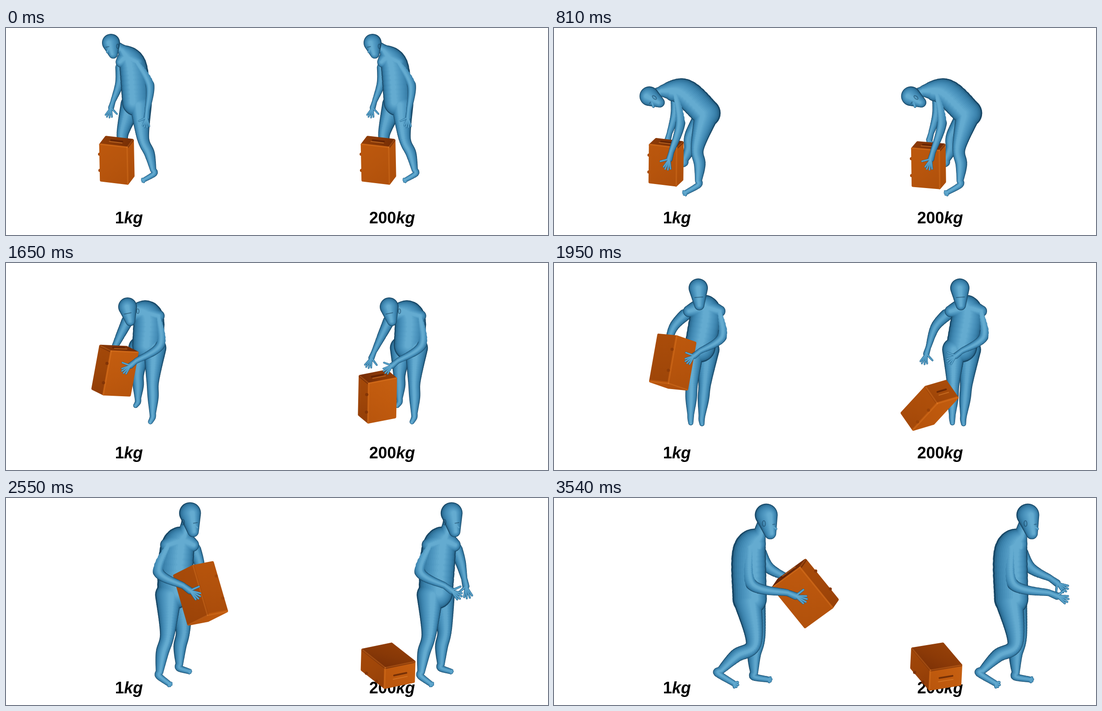
Recreate the animation shown at these times as an HTML page with a canvas. Size 1208 by 463 pixels, loop 3.57 s.

```html
<!DOCTYPE html>
<html lang="en">
<head>
<meta charset="utf-8">
<title>1kg and 200kg</title>
<style>
  html, body { margin: 0; width: 1208px; height: 463px; overflow: hidden; background: #fff; }
  svg, canvas { position: absolute; left: 0; top: 0; display: block; }
  text { font: bold 36px "Liberation Sans", Arial, sans-serif; fill: #000; }
  tspan { font-style: italic; }
</style>
</head>
<body>
<svg width="1208" height="463">
  <text x="243" y="437">1<tspan>kg</tspan></text>
  <text x="809.5" y="437">200<tspan>kg</tspan></text>
</svg>
<canvas id="stage" width="1208" height="463"></canvas>
<script>
const ctx = document.getElementById('stage').getContext('2d');
const LOOP = 3570, STEP = 30, SHIFT = 583, LAYERS = 11;
const CASE_HALF = [33, 47, 22], LIGHT = [.25, .45, .5];
const SKIN = [[24, 72, 103], [46, 112, 152], [62, 134, 176], [78, 151, 192], [100, 171, 208]];
const CASE = [[92, 30, 4], [156, 68, 8], [192, 90, 14], [228, 126, 36]];

// Key poses: facing runs from -1 (left) to 1 (right); pairs are right, left
const stand = {
  at: 0, facing: -.8, size: .88, elbows: [-6, -16], lift: 0,
  head: [234, 33], chin: [239, 58], neck: [262, 50], chest: [283, 84], pelvis: [290, 166],
  handR: [239, 163], handL: [315, 184], footR: [258, 300], footL: [328, 317]
};
const stoop = {
  at: 390, facing: -1, size: .96, elbows: [-5, -8], lift: 0,
  head: [211, 141], chin: [234, 155], neck: [242, 129], chest: [288, 133], pelvis: [335, 180],
  handR: [254, 222], handL: [262, 276], footR: [292, 295], footL: [322, 342]
};
const turn = {
  at: 1650, facing: -.2, size: .92, elbows: [0, -32], lift: 0,
  head: [271, 98], chin: [277, 130], neck: [292, 102], chest: [317, 121], pelvis: [315, 184],
  handR: [238, 197], handL: [290, 219], footR: [294, 302], footL: [327, 336]
};
const carry = {
  at: 2250, facing: .2, size: .99, elbows: [24, -25], lift: 0,
  head: [370, 33], chin: [374, 74], neck: [363, 82], chest: [361, 108], pelvis: [346, 195],
  handR: [285, 182], handL: [371, 184], footR: [322, 378], footL: [334, 352]
};
const walk = {
  at: 2820, facing: .97, size: 1.12, elbows: [48, 14], lift: 0,
  head: [437, 35], chin: [446, 76], neck: [420, 82], chest: [399, 115], pelvis: [400, 222],
  handR: [484, 209], handL: [486, 176], footR: [357, 393], footL: [433, 385]
};
const moved = (pose, dx, dy, changes) => {
  const next = { ...pose };
  for (const name of ['head', 'chin', 'neck', 'chest', 'pelvis', 'handR', 'handL'])
    next[name] = [pose[name][0] + dx, pose[name][1] + dy];
  return { ...next, ...changes };
};
const poses = [
  stand, stoop,
  moved(stoop, 6, 16, { at: 1260, elbows: [-5, -24], handL: stoop.handL }),
  turn, carry, walk,
  moved(walk, 36, 3, { at: 3540, lift: 36, footR: [371, 386], footL: [446, 391] })
];

// Suitcases: place, and yaw, pitch, roll
const resting = [
  { at: 0, place: [247, 296], turn: [-.32, .43, -.02] },
  { at: 390, place: [251, 305], turn: [-.37, .4, -.02] }
];
const lifted = [
  ...resting,
  { at: 1260, place: [247, 288], turn: [-.2, .25, .08] },
  { at: 1650, place: [243, 241], turn: [.6, .2, .18] },
  { at: 2250, place: [313, 212], turn: [1.33, -.39, .16] },
  { at: 2820, place: [526, 214], turn: [2.72, .1, -.66] },
  { at: 3540, place: [560, 214], turn: [2.75, .12, -.68] }
];
const toppled = [
  ...resting,
  { at: 1260, place: [252, 308], turn: [-.08, .3, 0] },
  { at: 1650, place: [245, 299], turn: [.48, .43, .02] },
  { at: 2250, place: [265, 349], turn: [1.91, .85, 1.72] },
  { at: 2820, place: [270, 388], turn: [2.5, .93, 2.46] },
  { at: 3540, place: [269, 377], turn: [2.5, .93, 2.44] }
];

const mix = (a, b, f) => a + (b - a) * f;
const clamp = f => Math.max(0, Math.min(1, f));
const smooth = f => (f = clamp(f)) * f * (3 - 2 * f);
const add = (p, x, y) => [p[0] + x, p[1] + y];
const between = (p, q, f) => [mix(p[0], q[0], f), mix(p[1], q[1], f)];
const unit = (p, q) => {
  const x = q[0] - p[0], y = q[1] - p[1], n = Math.hypot(x, y) || 1;
  return [x / n, y / n];
};
// Midpoint of p and q, pushed sideways
const joint = (p, q, push) => {
  const [x, y] = unit(p, q);
  return add(between(p, q, .5), -y * push, x * push);
};

function tint(stops, f) {
  const p = clamp(f) * (stops.length - 1);
  const i = Math.min(Math.floor(p), stops.length - 2);
  return `rgb(${stops[i].map((c, n) => Math.round(mix(c, stops[i + 1][n], p - i)))})`;
}

// Monotone cubic through the keys, for every field
function sample(keys, t) {
  let i = 0;
  while (i < keys.length - 2 && t >= keys[i + 1].at) i++;
  const h = keys[i + 1].at - keys[i].at, f = (t - keys[i].at) / h, g = 1 - f;
  const curve = get => {
    const slope = k => (get(keys[k + 1]) - get(keys[k])) / (keys[k + 1].at - keys[k].at);
    const tangent = k => {
      if (k === 0) return slope(0);
      if (k === keys.length - 1) return slope(k - 1) * .4;
      const p = slope(k - 1), q = slope(k);
      return p * q <= 0 ? 0 : 2 * p * q / (p + q);
    };
    return get(keys[i]) * (1 + 2 * f) * g * g + get(keys[i + 1]) * f * f * (3 - 2 * f)
      + h * f * g * (g * tangent(i) - f * tangent(i + 1));
  };
  const out = {};
  for (const name in keys[0]) {
    const v = keys[0][name];
    out[name] = Array.isArray(v) ? v.map((_, j) => curve(k => k[name][j])) : curve(k => k[name]);
  }
  return out;
}

// Discs along a smooth line of [x, y, r] points
function tube(...pts) {
  const discs = [];
  for (let i = 0; i < pts.length - 1; i++) {
    const a = pts[Math.max(i - 1, 0)], b = pts[i], c = pts[i + 1];
    const d = pts[Math.min(i + 2, pts.length - 1)];
    const len = Math.hypot(c[0] - b[0], c[1] - b[1]);
    const n = Math.ceil(len / (Math.min(b[2], c[2]) * .35)) + 1;
    for (let k = 0; k <= n; k++) {
      const f = k / n;
      discs.push(b.map((v, j) => v + .5 * f * (c[j] - a[j]
        + f * (2 * a[j] - 5 * v + 4 * c[j] - d[j] + f * (3 * (v - c[j]) + d[j] - a[j])))));
    }
  }
  return discs;
}

// Fill the tubes from dark rim to bright core; fade softens the first tube's root
function paint(tubes, lean, dim = 0, fade = 0) {
  for (let k = 0; k < LAYERS; k++) {
    const f = k / (LAYERS - 1);
    ctx.fillStyle = tint(SKIN, Math.pow(f, .65) - dim);
    ctx.beginPath();
    tubes.forEach((discs, n) => {
      const from = n ? 0 : Math.floor(fade * (1 - f) * discs.length);
      for (let i = from; i < discs.length; i++) {
        const [x, y, r] = discs[i], s = r * (1 - .8 * f), cx = x + lean * r * f;
        ctx.moveTo(cx + s, y);
        ctx.arc(cx, y, s, 0, 7);
      }
    });
    ctx.fill();
  }
}

function digits(from, tip, angles, r) {
  const dx = tip[0] - from[0], dy = tip[1] - from[1];
  return angles.map(([a, len]) => {
    const c = Math.cos(a) * len, s = Math.sin(a) * len;
    return tube([...from, r + .6], [...add(from, dx * c - dy * s, dx * s + dy * c), r]);
  });
}

function arm(shoulder, wrist, bend, s, thumb) {
  const elbow = joint(shoulder, wrist, bend);
  const [x, y] = unit(elbow, wrist);
  const tip = add(wrist, x * 39 * s, (y + .18) * 37 * s);
  const palm = between(wrist, tip, .42);
  return [
    tube([...shoulder, 15.5 * s], [...elbow, 11.5 * s], [...wrist, 6.8 * s]),
    tube([...wrist, 6.5 * s], [...palm, 7.5 * s]),
    ...digits(palm, tip, [[-.38, .92], [-.13, 1], [.13, 1], [.36, .9], [thumb, .85]], 2.1 * s)
  ];
}

function leg(hip, ankle, bend, facing, near, s) {
  const knee = joint(hip, ankle, -bend);
  const [x, y] = unit(knee, ankle);
  const heel = add(ankle, x * 9, y * 9);
  const toe = add(ankle, facing * 34 * s, mix(14, 30, near) * s);
  const ball = between(heel, toe, .8);
  return [
    tube([...hip, 28 * s], [...knee, 15.5 * s],
      [...joint(knee, ankle, facing * 4), 13.5 * s], [...ankle, 8 * s]),
    tube([...ankle, 8 * s], [...heel, 7.5 * s], [...ball, 6 * s]),
    ...digits(ball, toe, [[-.7, 1], [-.2, 1.1], [.3, 1.05], [.75, .95]], 2.6 * s)
  ];
}

function drawHead({ head, chin, facing, size }, lean) {
  const r = 22.8 * size, [x, y] = unit(head, chin);
  const along = (p, fwd, down) => add(p, y * fwd + x * down, -x * fwd + y * down);
  const nose = along(chin, 15 * facing, -7);
  paint([
    tube([...head, r], [...chin, r * .52]),
    tube([...along(nose, -6 * facing, -6), 4], [...nose, 2.8])
  ], lean);
  ctx.lineCap = 'round';
  ctx.lineWidth = 2;
  ctx.strokeStyle = 'rgba(18,58,86,.5)';
  const brow = along(nose, -3 * facing, -11), wide = 7 * (1 - Math.abs(facing)) + 2;
  ctx.beginPath();
  ctx.moveTo(...along(brow, -wide, 0));
  ctx.lineTo(...along(brow, wide, 0));
  ctx.stroke();
  if (Math.abs(facing) < .15) return;
  const back = r * (.85 * Math.sqrt(1 - facing * facing) + .15);
  const ear = along(between(head, chin, .42), -Math.sign(facing) * back, 0);
  ctx.beginPath();
  ctx.ellipse(...ear, r * .13, r * .25, Math.atan2(y, x) - 1.4, 0, 7);
  ctx.stroke();
}

// Columns of roll * pitch * yaw, scaled to the half sizes; z points at the viewer
function caseAxes([yaw, pitch, roll], scale) {
  const cy = Math.cos(yaw), sy = Math.sin(yaw), cp = Math.cos(pitch), sp = Math.sin(pitch);
  const cr = Math.cos(roll), sr = Math.sin(roll);
  return [[cy, 0, -sy], [0, 1, 0], [sy, 0, cy]].map(([x, y, z], n) => {
    const py = y * cp + z * sp, pz = z * cp - y * sp;
    return { n: [x * cr - py * sr, x * sr + py * cr, pz], half: CASE_HALF[n] * scale };
  });
}

function drawCase({ place, turn }, scale) {
  const axes = caseAxes(turn, scale);
  const sides = axes.map(a => a.n[2] > 0 ? 1 : -1);
  const spot = (...k) => [0, 1].map(j =>
    axes.reduce((sum, a, n) => sum + a.n[j] * a.half * k[n], place[j]));
  const line = (p, q, width, colour) => {
    ctx.beginPath();
    ctx.moveTo(...p);
    ctx.lineTo(...q);
    ctx.lineWidth = width;
    ctx.strokeStyle = colour;
    ctx.stroke();
  };
  const shades = axes.map((a, n) =>
    .32 + .5 * sides[n] * a.n.reduce((sum, v, j) => sum + v * LIGHT[j], 0));
  const wheels = () => [-.4, .45].forEach(b => {
    ctx.fillStyle = tint(CASE, shades[0] - .15);
    ctx.beginPath();
    ctx.arc(...spot(-1.04, b, .8), 3.5, 0, 7);
    ctx.fill();
  });

  ctx.lineJoin = ctx.lineCap = 'round';
  if (sides[0] > 0) wheels();
  for (let n = 0; n < 3; n++) {
    const ring = [[-1, -1], [1, -1], [1, 1], [-1, 1]].map(([p, q]) => {
      const k = [];
      k[n] = sides[n] * .94;
      k[(n + 1) % 3] = p * .93;
      k[(n + 2) % 3] = q * .93;
      return spot(...k);
    });
    ring.sort.call([], () => 0);
    const byHeight = [...ring].sort((a, b) => a[1] - b[1]);
    const g = ctx.createLinearGradient(...byHeight[0], ...byHeight[3]);
    [.05, 0, -.07].forEach((d, i) => g.addColorStop(i / 2, tint(CASE, shades[n] + d)));
    ctx.beginPath();
    ring.forEach(p => ctx.lineTo(...p));
    ctx.closePath();
    ctx.fillStyle = ctx.strokeStyle = g;
    ctx.lineWidth = 6;
    ctx.fill();
    ctx.stroke();
  }
  const corner = sides.map(v => v * .96);
  for (let n = 0; n < 3; n++)
    line(spot(...corner), spot(...corner.map((v, j) => j === n ? -v : v)), 3, 'rgba(230,130,44,.3)');
  if (sides[0] < 0) wheels();
  if (sides[1] < 0) {
    line(spot(-.4, -1, -.1), spot(.4, -1, -.1), 4, 'rgba(88,30,4,.7)');
    line(spot(-.45, -1, .25), spot(.45, -1, .25), 2, 'rgba(232,140,56,.5)');
  }
}

function drawFigure(t, caseKeys, growth) {
  const p = sample(poses, t), { facing, size: s } = p;
  const front = Math.sqrt(1 - facing * facing), near = (facing + 1) / 2, lean = .3 * facing;
  const top = add(between(p.neck, p.chest, .65), 0, 4);
  const [shoulderR, shoulderL] = [-1, 1].map(k => add(top, k * 36 * s * front, 0));
  const [hipR, hipL] = [-1, 1].map(k => add(p.pelvis, k * 17 * front, 6));
  const bend = facing * 11;
  const arms = [
    arm(shoulderR, p.handR, p.elbows[0], s, -1.05),
    arm(shoulderL, p.handL, p.elbows[1], s, 1.05)
  ];
  const legs = [
    leg(hipR, p.footR, bend + p.lift, facing, near, s),
    leg(hipL, p.footL, bend, facing, 1 - near, s)
  ];
  // The right side comes to the front as the body turns
  if (facing < .4) arms.reverse();
  if (facing < 0) legs.reverse();
  const wide = 32 * s * (1 + .14 * front);
  const torso = [
    tube([...p.neck, 14 * s], [...p.chest, wide], [...p.pelvis, 33.5 * s * (1 + .1 * front)]),
    tube([...p.neck, 13 * s], [...between(p.neck, p.head, .65), 12 * s]),
    tube([...shoulderR, 14 * s], [...between(p.neck, p.chest, .5), 23 * s], [...shoulderL, 14 * s])
  ];
  paint(legs[1], lean, .06);
  paint(arms[1], lean, .06, .15);
  paint([...torso, ...legs[0]], lean);
  drawHead(p, lean);
  drawCase(sample(caseKeys, t), 1 + growth * smooth((t - 900) / 1700));
  paint(arms[0], lean, 0, .4);
}

const start = performance.now();
let shown = -1;
function frame() {
  const t = Math.floor((performance.now() - start) % LOOP / STEP) * STEP;
  if (t !== shown) {
    shown = t;
    ctx.clearRect(0, 0, 1208, 463);
    drawFigure(t, lifted, .3);
    ctx.save();
    ctx.translate(SHIFT, 0);
    drawFigure(t, toppled, .19);
    ctx.restore();
  }
  requestAnimationFrame(frame);
}
frame();
</script>
</body>
</html>
```
